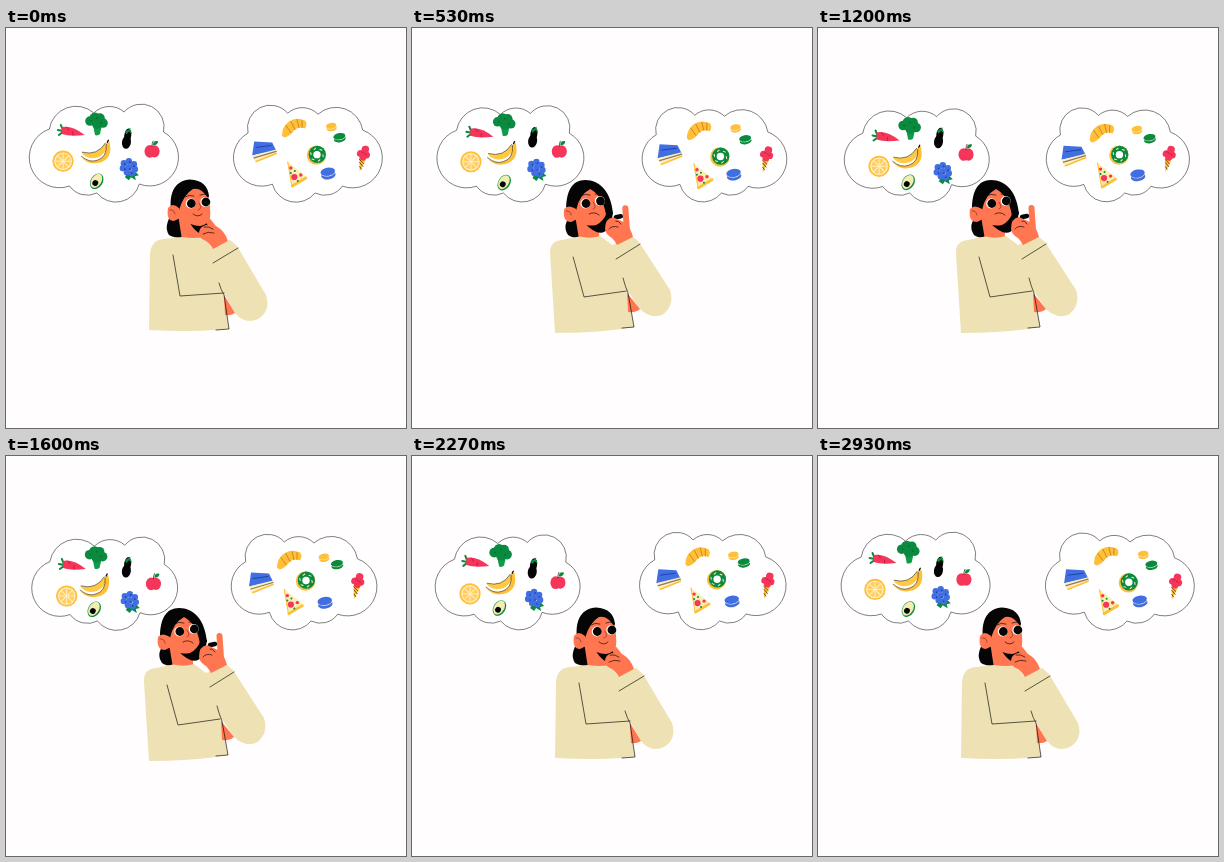
Recreate the animation shown at these times as an HTML page. Size 400x400 px, loop 3 s.

```html
<!DOCTYPE html>
<html lang="en">
<head>
<meta charset="utf-8">
<title>Choosing what to eat</title>
<style>
html, body { margin: 0; width: 100%; height: 100%; overflow: hidden; background: #fffdfe; }
svg { display: block; width: 100vw; height: 100vh; }
</style>
</head>
<body>
<svg id="stage" viewBox="0 0 400 400"></svg>
<script>
const stage = document.getElementById('stage');
const SKIN = '#ff7650', CREAM = '#eee2b5', INK = '#050505', RED = '#f5355a',
  GREEN = '#098a3f', BLUE = '#416fe2', GOLD = '#ffbf38', PALE = '#fff0c4';
const LOOP = 3, FPS = 15;

const shape = (d, fill) => `<path d="${d}" fill="${fill}"/>`;
const line = (d, color = INK, w = 0.65) =>
  `<path d="${d}" fill="none" stroke="${color}" stroke-width="${w}" stroke-linecap="round" stroke-linejoin="round"/>`;
const dot = (x, y, r, fill, ry = r) => `<ellipse cx="${x}" cy="${y}" rx="${r}" ry="${ry}" fill="${fill}"/>`;
const dots = (list, r, fill) => list.map(([x, y]) => dot(x, y, r, fill)).join('');
const turn = (angle, body) => `<g transform="rotate(${angle})">${body}</g>`;

const wave = (t, peak, harmonic = 1) => Math.cos(2 * Math.PI * harmonic * (t - peak) / LOOP);
const mix = (a, b, k) => a + (b - a) * k;
const clamp = v => Math.max(0, Math.min(1, v));
const ease = v => v < 0.5 ? 4 * v ** 3 : 1 - 4 * (1 - v) ** 3;

// Blends two paths that share the same commands
function morph(a, b, k) {
  const to = b.match(/[\d.]+/g);
  let i = 0;
  return a.replace(/[\d.]+/g, n => mix(+n, +to[i++], k).toFixed(2));
}

const macaron = (rx, ry, color) => turn(-10,
  dot(0, ry * 0.35, rx, color, ry * 0.8) + line(`M${-rx} 0Q0 ${ry * 1.1} ${rx} 0.5`, PALE, 0.8) +
  dot(0, -ry * 0.3, rx, color, ry * 0.75));

const art = {
  carrot: line('M-7 0L-12 -1M-7 -1L-9 -6M-7 1L-11 4', GREEN, 2) +
    shape('M-8 -4Q2 -6 15 4Q0 6 -8 3Z', RED) + line('M-3 -4L-1 -1M3 4L3 1', '#b71740', 0.8),
  broccoli: shape('M-3 1L-1 11Q2 12 4 10L6 1Z', '#0f9b49') +
    dots([[-6, -3], [7, -1], [4, -6]], 4.8, GREEN) + dot(-1, -6, 5.5, GREEN) + dot(1, 0, 5, GREEN) +
    dots([[-5, -3], [1, -6], [5, -1]], 0.8, '#075f30'),
  orange: dot(0, 0, 10.6, GOLD) + dot(0, 0, 8.8, PALE) + dot(0, 0, 7.6, '#ffcd61') +
    [0, 45, 90, 135].map(a => turn(a, line('M-8 0H8', PALE, 1))).join(''),
  banana: shape('M-15 4Q-6 11 2 8Q12 5 11 -9L14 -11Q18 5 6 10Q-7 14 -15 4Z', GOLD) +
    shape('M-14 0Q2 4 10 -9L12 -7Q9 6 -4 6Q-11 5 -14 0Z', '#ffca42') +
    line('M-14 4Q-6 11 2 8Q12 5 11 -8M-13 0Q2 4 10 -9', '#3e3013') + line('M12 -10L13 -12', INK, 1.3),
  eggplant: turn(8, dot(0, 4, 4.5, INK, 6.6) + dot(0.3, -3, 3.5, INK, 7) +
    shape('M-3 -6Q0 -11 3 -8L4 -5L1 -7L-1 -4Z', GREEN) + line('M1 -8L1.5 -10', GREEN, 1.2)),
  apple: dot(-2.3, 1.2, 5.2, RED, 6.3) + dot(2.4, 1.2, 5.2, RED, 6.2) +
    line('M0 -4Q0 -7 1 -9') + shape('M1 -5Q1 -10 6 -9Q6 -5 1 -5Z', GREEN),
  berries: shape('M-4 9L-1 4L7 4L10 7L6 8L7 12L2 9L0 12Z', GREEN) +
    dots([[-5, -5], [0, -7], [5, -4], [-6, 0], [0, -1], [6, 1], [-2, 4], [3, 5]], 3.2, BLUE) +
    dots([[-4, -4], [1, -6], [5, -2], [-4, 1], [1, 1], [3, 5]], 0.8, '#153a9c'),
  avocado: turn(32, dot(0, 0, 6, GREEN, 8.4) + dot(-0.5, -0.2, 5, '#f4edb1', 7.6) + dot(-0.3, 2.2, 2.9, INK)),
  croissant: shape('M-12 8Q-12 -1 -5 -6Q2 -11 11 -7Q14 -4 11 1Q5 -2 0 3Q-4 9 -10 10Z', GOLD) +
    line('M-8 -2L-3 5M-3 -6L1 2M3 -8L5 0M8 -7L8 0', '#c67913', 0.8),
  cake: shape('M-10 -10L8 -9L12 -1L-12 4Z', BLUE) + shape('M-12 4L12 -2L13 2L-9 11Z', PALE) +
    line('M-10 6.5L12 0', '#8c7a55', 1.3) + line('M-8 10L12 2', GOLD, 1.6) +
    line('M-8 -4L7 -6', '#143b9e', 0.8),
  pizza: shape('M-8 -13L12 3L-3 13Z', '#faeeb0') + line('M-7 -12L-3 12', GOLD, 1) +
    line('M-2.5 12L11 4', GOLD, 2.8) + dot(-0.5, 3, 3.1, RED) + dots([[-4, -6], [6, 1]], 1.7, RED) +
    dots([[0, -3], [-4, -1], [3, 7]], 1, GREEN),
  donut: dot(-0.5, 0.5, 9.7, GOLD) + dot(0.3, -0.3, 8.6, GREEN) + dot(0, 0, 3.7, '#fff') +
    [10, 70, 130, 190, 250, 310].map(a => turn(a, line('M5.8 -1L6.5 1', PALE, 1))).join(''),
  lemon: macaron(5.2, 3.8, GOLD),
  mint: macaron(6, 4.2, GREEN),
  blueMacaron: macaron(7.3, 5.3, BLUE),
  cone: turn(13, shape('M-4 -1L0 15L4 -1Z', GOLD) + line('M-3 3L2 6M-2 6L2 9M-1 10L1 12', '#6d4418', 0.9) +
    dots([[-3.5, -3], [3, -3], [0, 0]], 3.4, RED) + dot(0.5, -8, 3.8, RED) + line('M-3 -5L3 -3', '#b71740'))
};

// name, centre x, y, then sway and its peak time for x and y
const food = [
  ['carrot', 64.6, 106, 2.4, 0.9, 3, 1.5],
  ['broccoli', 90, 98.8, 1.9, 0.75, 2.9, 1.65],
  ['orange', 59, 136.5, 2.1, 1.3, 3.6, 1.7],
  ['banana', 88.8, 127.1, 0.8, 0.4, 2.9, 1.55],
  ['eggplant', 121, 110.5, 0.2, 0.7, 1.6, 2.2],
  ['apple', 146.8, 124.3, 1.2, 1.1, 2.5, 1.75],
  ['berries', 123.5, 142.6, 1.5, 0.95, 2.5, 1.6],
  ['avocado', 89.7, 153.4, 2.5, 0.55, 1.4, 0.8],
  ['croissant', 285.5, 101.8, 2.5, 0.05, 2.7, 1.2],
  ['cake', 256.6, 125.2, 1.6, 0.1, 2.6, 1.1],
  ['pizza', 287.2, 146, 2, 0.3, 1.9, 0.75],
  ['donut', 305.5, 125.8, 5.5, 0.05, 2.7, 0.6],
  ['lemon', 321.7, 100.3, 3.7, 0.05, 1.6, 1.3],
  ['mint', 332.4, 109.2, 1.3, 0.2, 2.5, 0.7],
  ['blueMacaron', 320.6, 146, 1.6, 0.2, 1.1, 1.1],
  ['cone', 354, 129, 3.3, 2.8, 0.9, 0.65]
];

// Corners between the lobes; the third value is lobe radius / corner distance
const corners = [
  [44, 101, 0.5], [88, 85, 0.57], [118, 84, 0.73], [157, 104, 0.515],
  [133, 156, 0.501], [91, 165, 0.56], [64, 158, 0.77]
];

function cloud(near, far, rise) {
  const pts = corners.map(([x, y, r]) => [
    x + mix(near, far, clamp((x - 40) / 115)),
    y + rise * clamp((165 - y) / 70), r
  ]);
  const arcs = pts.map(([x, y, k], i) => {
    const [px, py] = pts[(i + 6) % 7];
    const r = k * Math.hypot(x - px, y - py);
    return `A${r} ${r} 0 0 1 ${x} ${y}`;
  });
  return `<path d="M${pts[6][0]} ${pts[6][1]}${arcs.join('')}Z"
    fill="#fff" stroke="#161616" stroke-width=".55"/>`;
}

function clouds(t) {
  const pulse = 1.5 * wave(t, 1.6, 2);
  return cloud(-0.3 + 1.2 * wave(t, 0.9), -0.4 + 1.5 * wave(t, 0.9) + pulse, 2.6 - 2.6 * wave(t, 0)) +
    `<g transform="matrix(-1 0 0 1 400 0)">${cloud(1.9 - 2.7 * wave(t, 0.1),
      0.6 + 1.5 * wave(t, 1.9) + pulse, 1.8 + 2 * wave(t, 0.9))}</g>`;
}

function eye(x, y, half) {
  const bowl = (cx, r, color) => shape(`M${cx - r} ${y}A${r} ${r} 0 0 0 ${cx + r} ${y}Z`, color);
  return half
    ? bowl(x, 5, '#fff') + bowl(x - 0.3, 3.7, INK) + line(`M${x - 5.2} ${y}H${x + 5.2}`, INK, 0.9)
    : dot(x - 0.3, y, 5, '#fff') + dot(x + 0.3, y, 4.4, INK);
}

function person(t) {
  const k = ease(clamp((t - 0.2) / 0.4)) - ease(clamp((t - 1.67) / 0.53));
  const half = Math.abs(t - 0.4) < 0.1 || Math.abs(t - 1.95) < 0.1;
  const fill = (a, b, color) => shape(morph(a, b, k), color);
  const draw = (a, b, color, w) => line(morph(a, b, k), color, w);
  return fill('M167 184Q157 198 163 207Q167 210 178 210L181 180Z',
      'M160 186Q149 197 156 207Q159 210 169 210L173 182Z', INK) +
    fill('M172 186L176 212Q186 215 196 211L196 190Z', 'M163 188L167 212Q178 214 187 209L187 190Z', SKIN) +
    fill('M181 189Q189 198 203 192L204 206Q190 210 181 189Z',
      'M172 195Q187 200 193 182L201 184Q196 219 172 195Z', INK) +
    fill('M143 302L144 226Q145 212 158 211L176 209Q188 211 198 209L206 220L224 212L231 218L260 267Q265 283 252 291Q239 297 229 285L217 264L223 301L210 302Q180 304 143 302Z',
      'M143 305L138 226Q137 213 150 212L167 208.5Q178 211 188 208L200 217L221 209L227 214L258 262Q263 278 250 287Q238 291 228 281L215 262L222 299L210 301Q180 305 143 305Z', CREAM) +
    fill('M218 267L219 287Q224 288 229 285Z', 'M215 265L216 284Q223 285 228 281Z', SKIN) +
    draw('M167 227L174 268L218 265', 'M161 229L172 269L214 263') +
    draw('M213 255Q215 262 218 267L223 301L210 302', 'M211 250Q213 258 216 265L222 299L210 300') +
    fill('M172 172Q178 162 186 159Q198 159 202 167Q205 180 204 190Q201 197 194 198Q184 198 176 190L172 188Z',
      'M162 172Q166 162 174 159Q186 162 191 168Q195 178 195 184Q191 194 184 197Q174 199 167 194L162 190Z', SKIN) +
    fill('M165 181C163 164 170 152 184 151.5C196 152 202 158 203 168L202 170Q195 159 187 161Q178 166 173 182Z',
      'M154 181C154 163 160 152 173 152C188 152 199 164 201 186L194 188Q191 168 178 161Q167 167 164 182Z', INK) +
    fill('M162 180Q160 193 168 193L174 190L173 180Q166 174 162 180Z',
      'M152 181Q150 194 159 194L165 191L164 181Q156 176 152 181Z', SKIN) +
    draw('M164 182Q168 181 169 186', 'M154 183Q158 182 159 187', '#7c281c') +
    eye(mix(185, 173.5, k), mix(175.5, 175.5, k), half) + eye(mix(199.6, 188, k), mix(174, 173, k), half) +
    draw('M179 169Q183 166 188 168', 'M168 168Q173 165 178 167') +
    draw('M194 167Q198 165 202 167', 'M183 166Q187 165 191 168') +
    draw('M193 175Q197 181 192 182', 'M181 174Q185 180 181 181', '#8b2d1e') +
    draw('M187 186Q192 190 196 186', 'M177 186Q182 183 187 187') +
    draw('M198 201L201 201', 'M204 189L209 188', INK, 4.5) +
    draw('M203 194L213 207', 'M213.5 180L215 202', SKIN, 6) +
    fill('M193 205Q193 199 200 197L210 198Q219 203 222 213L207 221Q203 214 198 212Q193 210 193 205Z',
      'M193 201Q193 190 201 189L214 195Q219 201 221 209L205 217Q203 213 200 210Q194 207 193 201Z', SKIN) +
    draw('M197 206Q202 203 208 205', 'M197 201Q200 197 206 199') +
    draw('M198 199Q203 198 207 201', 'M204 193Q207 192 209 196') +
    fill('M204 224L224 212L232 220L212 236Z', 'M201 221L221 209L228 216L209 232Z', CREAM) +
    draw('M207 235L232 220', 'M204 231L228 216');
}

function render(now) {
  const t = Math.floor((now + 5) * FPS / 1000) / FPS % LOOP;
  stage.innerHTML = clouds(t) + food.map(([name, x, y, ax, px, ay, py]) =>
    `<g transform="translate(${x + ax * wave(t, px)} ${y + ay * wave(t, py)})">${art[name]}</g>`).join('') + person(t);
}

const start = performance.now();
function tick() {
  render(performance.now() - start);
  requestAnimationFrame(tick);
}
tick();
</script>
</body>
</html>
```
